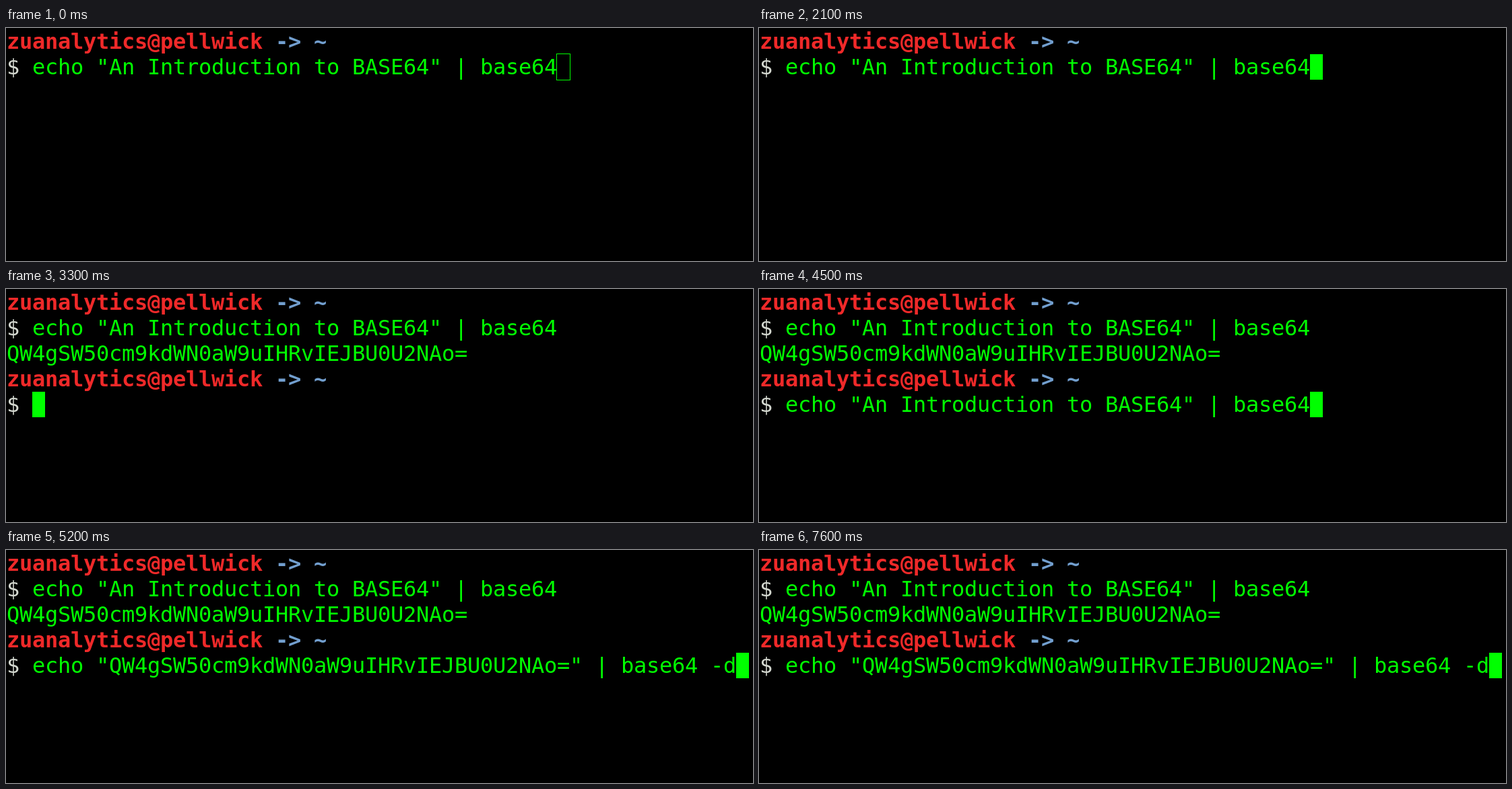
Recreate the animation shown at these times as an HTML page. Size 1109 by 347 pixels, loop 8 s.

```html
<!DOCTYPE html>
<html lang="en">
<head>
<meta charset="utf-8">
<title>base64 in a terminal</title>
<style>
  html, body { margin: 0; width: 100%; height: 100%; overflow: hidden; background: #000; }
  pre {
    position: absolute; left: 1px; top: 1px; margin: 0;
    font: 32px/38px "DejaVu Sans Mono", monospace;
    letter-spacing: calc(19px - 1ch); /* whole-pixel terminal cells */
    font-variant-ligatures: none;
    color: #0f0;
  }
  .user { color: #ef2929; }
  .path { color: #729fcf; }
  .sign { color: #d3d7cf; }
  #caret { position: absolute; width: 19px; height: 38px; background: #0f0; }
  #caret.hollow { margin: -1px; border: 1px solid #0f0; background: none; }
  #mouse { position: absolute; left: 0; top: 0; }
</style>
</head>
<body>
<pre id="screen"></pre>
<div id="caret"></div>
<svg id="mouse" width="5" height="12" fill="none" stroke="#fff"><path d="M0 .5h2m1 0h2M2.5 1v10M0 11.5h2m1 0h2"/></svg>
<script>
const LOOP = 8000, CELL_W = 19, CELL_H = 38, BLINK = 600;
const FOCUS = 1200, ENTER = 2100;
const [screen, caret, mouse] = ['screen', 'caret', 'mouse'].map(id => document.getElementById(id));

const PROMPT = '<b class="user">zuanalytics@pellwick</b> <b class="path">-&gt; ~</b>\n<span class="sign">$</span> ';
const ENCODED = 'QW4gSW50cm9kdWN0aW9uIHRvIEJBU0U2NAo=';
const ENCODE = 'echo "An Introduction to BASE64" | base64';
const DECODE = `echo "${ENCODED}" | base64 -d`;

// Commands recalled on the second prompt, by time.
const RECALLED = [[2200, ''], [4500, ENCODE], [4700, 'clear'], [5200, DECODE]];
const KEY_TIMES = [FOCUS, ENTER, 4500, 4700, 5200];

let shown;
function draw(t) {
  const recalled = RECALLED.findLast(([at]) => t >= at);
  const command = recalled ? recalled[1] : ENCODE;
  const html = recalled ? PROMPT + ENCODE + '\n' + ENCODED + '\n' + PROMPT + command : PROMPT + command;
  if (html !== shown) screen.innerHTML = shown = html;

  const lastKey = KEY_TIMES.findLast(at => t >= at);
  const focused = lastKey !== undefined;
  caret.className = focused ? '' : 'hollow';
  caret.style.left = 1 + CELL_W * (2 + command.length) + 'px';
  caret.style.top = 1 + CELL_H * (recalled ? 4 : 1) + 'px';
  caret.style.visibility = focused && Math.floor((t - lastKey) / BLINK) % 2 ? 'hidden' : 'visible';

  // The pointer glides in from the top edge in 100 ms steps.
  const p = Math.min(1, (Math.floor(t / 100) - 5) / 6);
  const ease = 1 - (1 - p) ** 2;
  mouse.style.visibility = t >= 500 && t < ENTER ? 'visible' : 'hidden';
  mouse.style.transform = `translate(${Math.round(595 + 244 * ease)}px, ${Math.round(42 * ease)}px)`;
}

let start;
function tick(now) {
  start ??= now;
  draw((now - start) % LOOP);
  requestAnimationFrame(tick);
}
draw(0);
requestAnimationFrame(tick);
</script>
</body>
</html>
```
